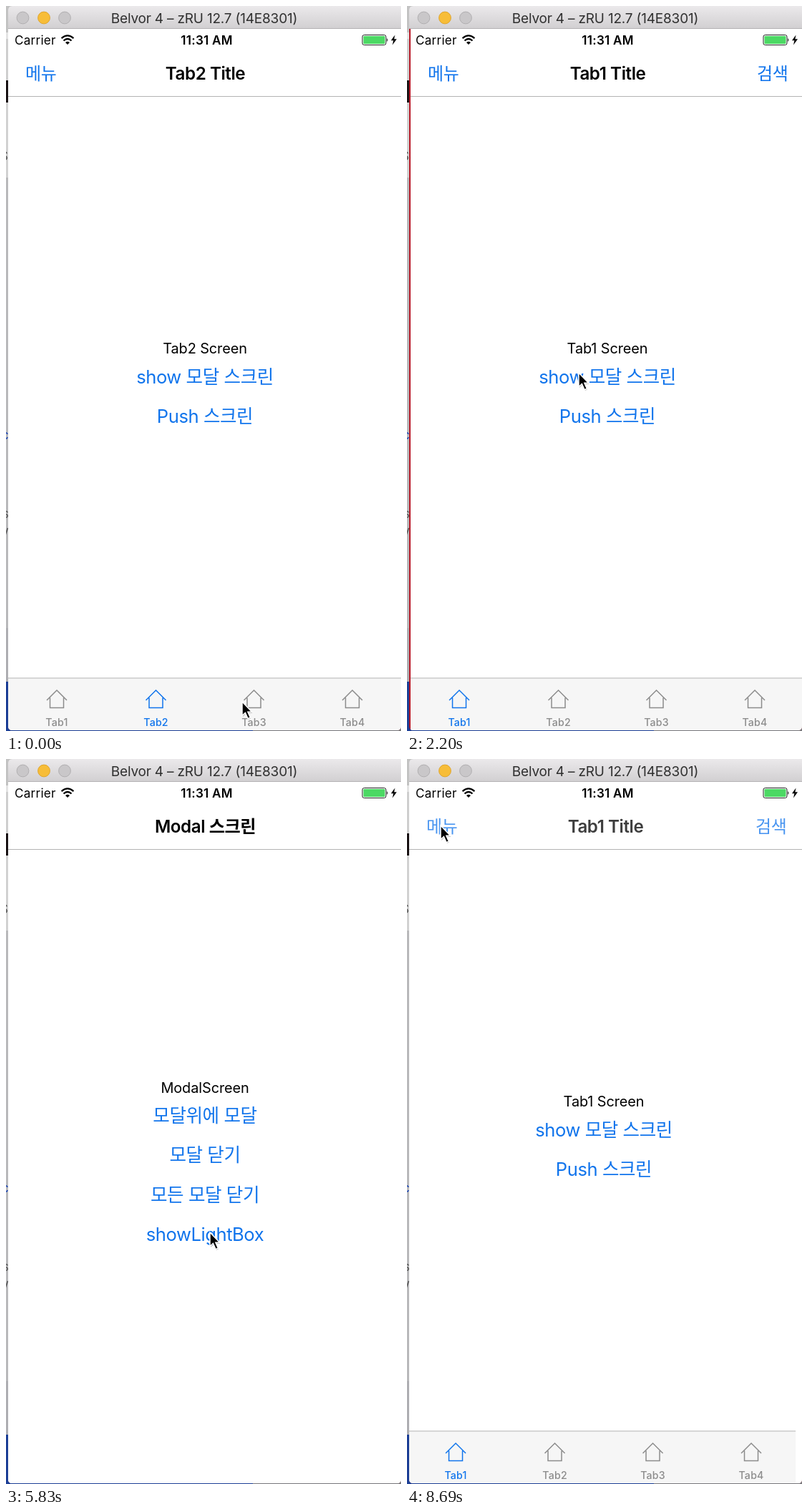
These frames come from a looping animation (552 by 1014 pixels, 8800 ms). An HTML page:

```html
<!DOCTYPE html>
<html lang="ko">
<head>
<meta charset="utf-8">
<title>Tab navigation demo</title>
<style>
html, body { margin: 0; width: 100%; height: 100%; overflow: hidden; background: #fff; }
svg { display: block; width: 552px; height: 1014px; }
text { font-family: Inter, "Noto Sans CJK KR", "Noto Sans CJK", sans-serif; }
.head { font-size: 24.2px; font-weight: 600; letter-spacing: -.45px; }
.label { font-size: 19.9px; letter-spacing: -.1px; }
.link { font-size: 25.6px; letter-spacing: -.45px; fill: #1074ec; }
.nav { font-size: 24px; letter-spacing: -.3px; fill: #1074ec; }
.tab { font-size: 14.2px; font-weight: 500; letter-spacing: .2px; }
.status { font-size: 17.1px; letter-spacing: .25px; }
.frame { font-size: 19px; letter-spacing: -.2px; fill: #303030; }
.mid { text-anchor: middle; }
.end { text-anchor: end; }
</style>
</head>
<body>
<svg id="stage" viewBox="0 0 552 1014" xmlns="http://www.w3.org/2000/svg"></svg>
<script>
const LOOP = 8800, STEP = 110;
const BLUE = '#1074ec', GRAY = '#8c8c8c', RED = '#a2212a', PRESSED = '#d8e2e7';

const text = (x, y, cls, s, extra = '') => `<text x="${x}" y="${y}" class="${cls}" ${extra}>${s}</text>`;
const rect = (x, y, w, h, fill, extra = '') =>
  `<rect x="${x}" y="${y}" width="${w}" height="${h}" fill="${fill}" ${extra}/>`;
const links = (y, list) => list.map((s, i) => text(278, y + i * 55.4, 'link mid', s)).join('');
const navLine = rect(3, 126, 550, 1, '#b4b4b4');

const tabs = [71, 209.5, 346.5, 484].map((x, i) => `
  <g id="tab${i + 1}" color="${GRAY}">
    <path d="M${x - 14} 971L${x} 957L${x + 14} 971M${x - 9.5} 967.5V981.5H${x + 9.5}V967.5"
      fill="none" stroke="currentColor" stroke-width="1.5"/>
    ${text(x, 1007, 'tab mid', 'Tab' + (i + 1), 'fill="currentColor"')}
  </g>`).join('');

const modal = id => `
  <g id="${id}">
    ${rect(3, 32, 550, 982, '#fff')}${navLine}
    ${text(278.5, 103, 'head mid', 'Modal 스크린')}
    ${text(278, 466.7, 'label mid', 'ModalScreen')}
    ${links(508, ['모달위에 모달', '모달 닫기', '모든 모달 닫기', 'showLightBox'])}
  </g>`;

const backdrop = `
  ${rect(0, 0, 552, 1014, '#c3c3c3')}
  ${rect(0, 37, 4, 9, '#e4e4e4')}${rect(0, 46, 4, 58, '#cfcfcf')}
  ${rect(0, 104, 4, 31, '#1b1416')}${rect(0, 135, 4, 105, '#d2d2d2')}
  ${rect(0, 240, 4, 630, '#b9b9bb')}
  ${rect(0, 870, 4, 75, '#aeaeb2')}${rect(0, 945, 345, 69, '#1c3f96')}
  ${rect(345, 1000, 207, 14, '#77777b')}
  ${text(-8, 216, 'status', 'S', 'fill="#555"')}
  ${text(-6, 606, 'status', 'c', 'fill="#1845b8"')}
  ${text(-5, 716, 'status', 's', 'fill="#555"')}
  ${text(-8, 743, 'status', 'V', 'fill="#555"')}`;

const statusBar = `
  ${text(12, 53.7, 'status', 'Carrier')}
  ${text(280.5, 53.7, 'status mid', '11:31 AM', 'font-weight="600"')}
  <g fill="none" stroke="#000" stroke-width="2.3">
    <path d="M77.6 45.2Q86 37.6 94.4 45.2M80.5 48.5Q86 43.4 91.5 48.5"/>
    <path d="M83 51Q86 48.4 89 51L86 54Z" fill="#000" stroke="none"/>
  </g>
  <rect x="498" y="40.5" width="33" height="14" rx="2.5" fill="none" stroke="#222"/>
  ${rect(499.5, 42, 30, 11, '#4cd964', 'rx="1.2"')}
  <path d="M532.3 45Q534.6 47.5 532.3 50Z"/>
  <path d="M543.5 40.5L538 48.3H541.4L540 54.5L546 46.3H542.4Z"/>`;

const titleBar = `
  <path d="M3 32V6Q3 0 9 0H552V32Z" fill="url(#chrome)"/>
  ${rect(3, 31, 549, 1, '#b4b2b4')}
  ${[[23.5, '#c9c7c9', '#b1afb1'], [53, '#f7bd38', '#dfa52c'], [82, '#c9c7c9', '#b1afb1']]
    .map(([x, f, s]) => `<circle cx="${x}" cy="16.5" r="8.4" fill="${f}" stroke="${s}"/>`).join('')}
  ${text(277, 23.5, 'frame mid', 'Belvor 4 – zRU 12.7 (14E8301)')}`;

document.getElementById('stage').innerHTML = `
  <defs>
    <linearGradient id="chrome" x2="0" y2="1">
      <stop stop-color="#ebe9eb"/><stop offset="1" stop-color="#d1cfd1"/>
    </linearGradient>
    <clipPath id="window"><path d="M3 32H552V1007Q552 1013 546 1013H9Q3 1013 3 1007Z"/></clipPath>
  </defs>
  ${backdrop}
  <g clip-path="url(#window)">
    ${rect(3, 32, 550, 982, '#b81c2a')}
    <g id="main">
      ${rect(3, 32, 550, 982, '#fff')}
      <g id="page">
        ${text(278, 486, 'label mid', '', 'id="label"')}
        ${links(528, ['show 모달 스크린', 'Push 스크린'])}
        ${rect(3, 940, 550, 74, '#f6f6f6')}${rect(3, 939.5, 550, 1, '#b4b4b4')}${tabs}
      </g>
      <g id="pushed">
        ${rect(3, 127, 550, 887, '#fff')}
        ${text(278, 577, 'label mid', 'PushedScreen')}
      </g>
      ${navLine}
      <g id="nav">
        ${text(278.5, 103, 'head mid', '', 'id="title"')}
        ${text(27, 102.5, 'nav', '메뉴', 'id="menu"')}
        ${text(530.5, 102.5, 'nav end', '검색', 'id="search"')}
      </g>
    </g>
    ${modal('modalA')}${modal('modalB')}
    <g id="lightbox">
      ${rect(3, 32, 550, 982, RED)}
      ${rect(210, 601, 136.5, 23.5, '#97396b')}
      ${text(278, 620, 'label mid', 'PushedScreen', 'fill="#84203f"')}
    </g>
    ${statusBar}
  </g>
  ${titleBar}
  <g id="cursor">
    <path d="M1 2V21L5.4 17L9 25L12 23.6L8.6 16H14.5Z" opacity=".22"/>
    <path d="M0 0V19.5L4.4 15.4L8 23.6L11.4 22.1L7.9 14.2H13.6Z" stroke="#fff" stroke-width="1.5"/>
  </g>`;

const el = {};
for (const node of document.querySelectorAll('[id]')) el[node.id] = node;

// Cursor stops: time, x, y
const path = [
  [0, 330, 973], [165, 340, 973], [440, 478, 973], [550, 478, 973], [825, 72, 973],
  [935, 72, 973], [1210, 56, 93], [1430, 56, 93], [1760, 470, 420], [1870, 470, 420],
  [2200, 240, 513], [2530, 240, 513], [2860, 280, 498], [3190, 280, 498],
  [3630, 285, 608], [4070, 285, 608], [4950, 285, 543], [5170, 285, 520],
  [5390, 285, 520], [5720, 285, 662], [5940, 285, 662], [6380, 427, 487],
  [6600, 427, 487], [7150, 288, 546], [7370, 288, 546], [7650, 285, 574],
  [7870, 285, 574], [8250, 47, 93], [8800, 47, 93]
];

const ease = (t, start, len) => 1 - (1 - Math.min(1, Math.max(0, (t - start) / len))) ** 3;
// Rises from 0 to 1 at "open" and returns at "close"
const pulse = (t, open, openLen, close, closeLen) =>
  ease(t, open, openLen) * (1 - ease(t, close, closeLen));

function cursorAt(t) {
  const i = path.findIndex(p => p[0] > t);
  const [t0, x0, y0] = path[i - 1], [t1, x1, y1] = path[i];
  const u = (t - t0) / (t1 - t0), k = u * u * (3 - 2 * u);
  return [x0 + (x1 - x0) * k, y0 + (y1 - y0) * k];
}

const move = (node, x, y) => node.setAttribute('transform', `translate(${x} ${y})`);
const show = (node, on) => node.setAttribute('display', on ? 'inline' : 'none');

function slideUp(node, p) {
  show(node, p > 0);
  move(node, 0, 982 * (1 - p));
}

function draw(t) {
  const tab = t < 110 ? 2 : t < 495 ? 3 : t < 880 ? 4 : 1;
  for (let i = 1; i <= 4; i++) el['tab' + i].setAttribute('color', i === tab ? BLUE : GRAY);
  el.label.textContent = `Tab${tab} Screen`;
  el.title.textContent = `Tab${tab} Title`;
  show(el.search, tab === 1);

  move(el.main, 440 * pulse(t, 1400, 396, 1870, 396), 0);

  const push = pulse(t, 7790, 440, 8360, 447);
  const fade = 1 - push ** .35;
  move(el.page, -165 * push, 0);
  move(el.pushed, 550 * (1 - push), 0);
  show(el.pushed, push > 0);
  el.nav.setAttribute('opacity', fade);
  move(el.title, -55 * push, 0);
  el.menu.style.fill = t >= 1210 && t < 1430 ? PRESSED : BLUE;

  slideUp(el.modalA, Math.max(pulse(t, 2400, 480, 3930, 460), pulse(t, 5260, 480, 7240, 460)));
  slideUp(el.modalB, pulse(t, 3050, 480, 3930, 460));
  el.lightbox.setAttribute('opacity', pulse(t, 5900, 360, 6520, 330));

  move(el.cursor, ...cursorAt(t));
}

const begin = performance.now();
function tick() {
  const t = (performance.now() - begin) % LOOP;
  draw(Math.floor(t / STEP) * STEP);
  requestAnimationFrame(tick);
}
tick();
</script>
</body>
</html>
```
